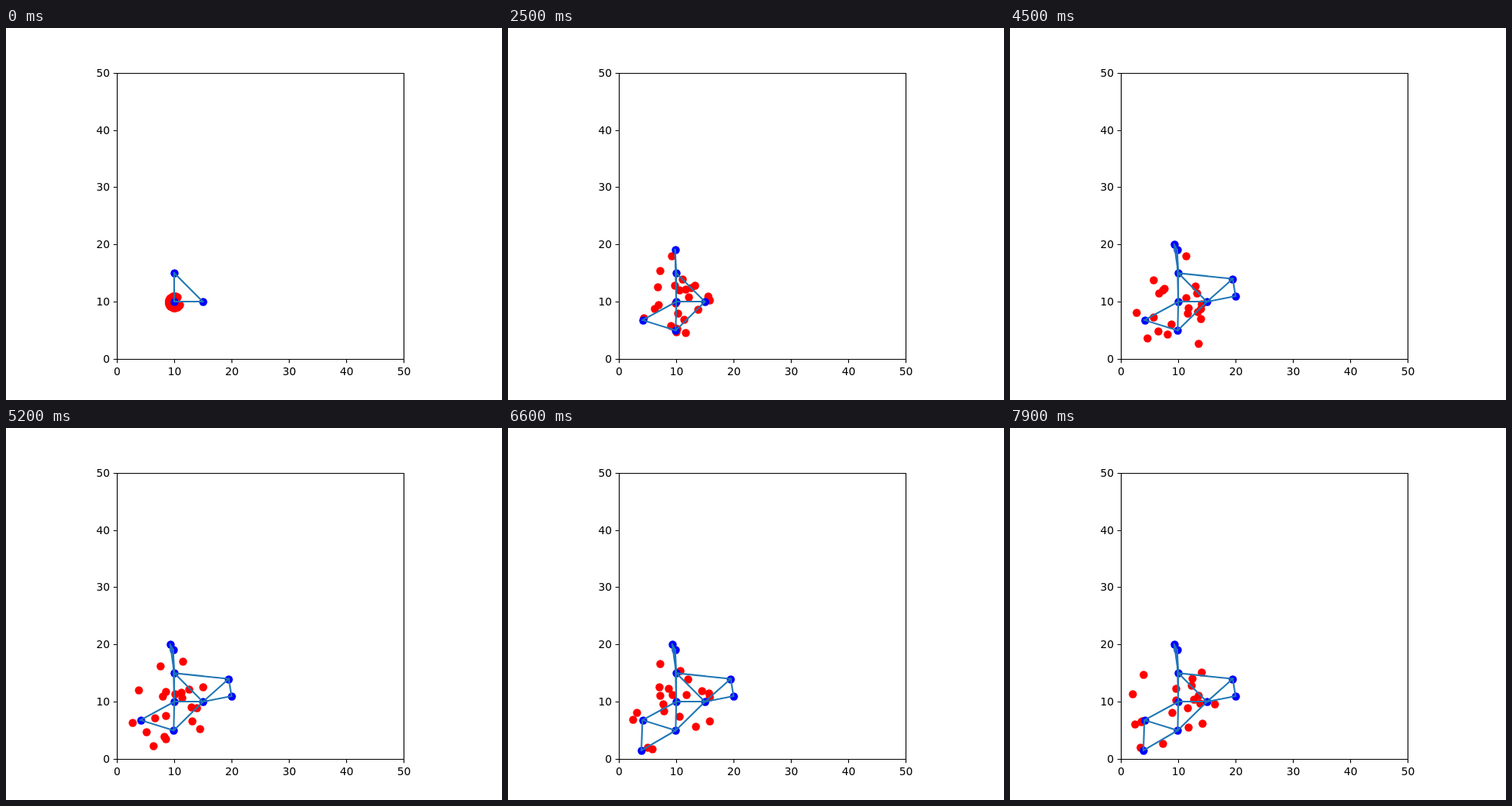
Animation of 640x480 px, one loop 8000 ms. Source, as an HTML page:

```html
<!DOCTYPE html>
<html lang="en">
<head>
<meta charset="utf-8">
<title>Random walkers joining a network</title>
<style>
  html, body { margin: 0; width: 100%; height: 100%; overflow: hidden; background: #fff; }
  svg { display: block; }
  .axes { fill: none; stroke: #000; stroke-width: 1.11; }
  .edge { stroke: #1f77b4; stroke-width: 2.08; stroke-linecap: square; }
  text { font: 13.89px "DejaVu Sans", sans-serif; }
</style>
</head>
<body>
<svg width="640" height="480" viewBox="0 0 640 480">
  <clipPath id="plot"><rect x="143.2" y="57.6" width="369.6" height="369.6"/></clipPath>
  <g clip-path="url(#plot)">
    <g id="walkers"></g>
    <g id="nodes"></g>
    <g id="edges"></g>
  </g>
  <g id="frame"></g>
</svg>
<script>
const STEP_MS = 100, STEPS = 80, WALKERS = 27, DOT = 5.2;
const px = x => 143.2 + 7.392 * x;
const py = y => 427.2 - 7.392 * y;
const snap = v => Math.round(v) + 0.5;
const dist = (a, b) => Math.hypot(a.x - b.x, a.y - b.y);
const show = (el, on) => el.setAttribute("visibility", on ? "visible" : "hidden");

function add(parent, tag, attrs, text = "") {
  const el = document.createElementNS("http://www.w3.org/2000/svg", tag);
  for (const key in attrs) el.setAttribute(key, attrs[key]);
  el.textContent = text;
  return document.getElementById(parent).appendChild(el);
}

function place(dot, p) {
  dot.setAttribute("cx", snap(px(p.x)));
  dot.setAttribute("cy", snap(py(p.y)));
}

let seed = 20;
function random() {
  seed = (seed * 1664525 + 1013904223) % 4294967296;
  return seed / 4294967296;
}

// Axes
add("frame", "path", { class: "axes", d: "M143.5 58.5H513.5V427.5H143.5Z" });
for (let v = 0; v <= 50; v += 10) {
  const x = snap(px(v)), y = snap(py(v));
  add("frame", "path", { class: "axes", d: `M${x} 427.5v4.86M143.5 ${y}h-4.86` });
  add("frame", "text", { x, y: 448, "text-anchor": "middle" }, v);
  add("frame", "text", { x: 134.2, y: y + 4.5, "text-anchor": "end" }, v);
}

// Network nodes: x, y, step of joining; each links to its two nearest elders
const nodes = [
  [10, 10, 0], [15, 10, 0], [10, 15, 0], [9.9, 5, 11], [9.8, 19.1, 17],
  [4.1, 6.8, 22], [9.3, 20, 27], [19.5, 14, 33], [20, 11, 41], [3.9, 1.5, 57]
].map(([x, y, start]) => ({ x, y, start }));
const home = nodes[0];

// Lines along the axes sit on whole pixels
function link(a, b) {
  const fit = a.x === b.x || a.y === b.y ? Math.round : v => v;
  return add("edges", "line", {
    class: "edge",
    x1: fit(px(a.x)), y1: fit(py(a.y)), x2: fit(px(b.x)), y2: fit(py(b.y))
  });
}

const joins = [];
nodes.forEach((node, i) => {
  const dot = add("nodes", "circle", { r: DOT, fill: "#00f" });
  place(dot, node);
  const near = nodes.slice(0, i).sort((a, b) => dist(a, node) - dist(b, node)).slice(0, 2);
  for (const el of [dot, ...near.map(other => link(other, node))])
    joins.push({ el, start: node.start });
});

const step = (p, a) => ({ x: p.x + Math.cos(a), y: p.y + Math.sin(a) });

// Unit steps in random directions: a walker with a goal keeps it within reach,
// the others stay in a slowly widening disc inside the axes
function walk(first, goal) {
  const path = [first], end = goal ? goal.start : STEPS;
  const allowed = (p, k) => goal
    ? dist(p, goal) <= end - k
    : dist(p, home) < 2 + 1.3 * Math.sqrt(k) && p.x > 1.2 && p.y > 1.2;
  for (let k = 1; k < end; k++) {
    const last = path[k - 1], aim = goal || home;
    let next = step(last, Math.atan2(aim.y - last.y, aim.x - last.x));
    for (let tries = 0; tries < 40; tries++) {
      const option = step(last, random() * 2 * Math.PI);
      if (allowed(option, k)) {
        next = option;
        break;
      }
    }
    path.push(next);
  }
  return path;
}

const goals = nodes.filter(n => n.start > 0);
const walkers = Array.from({ length: WALKERS }, (_, i) => {
  const turn = (i * 4) % WALKERS / (WALKERS - 1);
  const first = step(home, (55 + 278 * turn) * Math.PI / 180);
  return { path: walk(first, goals[i]), dot: add("walkers", "circle", { r: DOT, fill: "#f00" }) };
});

function draw(k) {
  for (const { path, dot } of walkers) {
    show(dot, path[k]);
    if (path[k]) place(dot, path[k]);
  }
  for (const { el, start } of joins) show(el, k >= start);
}

const begin = performance.now();
function tick() {
  draw(Math.floor((performance.now() - begin) / STEP_MS) % STEPS);
  requestAnimationFrame(tick);
}
tick();
</script>
</body>
</html>
```
